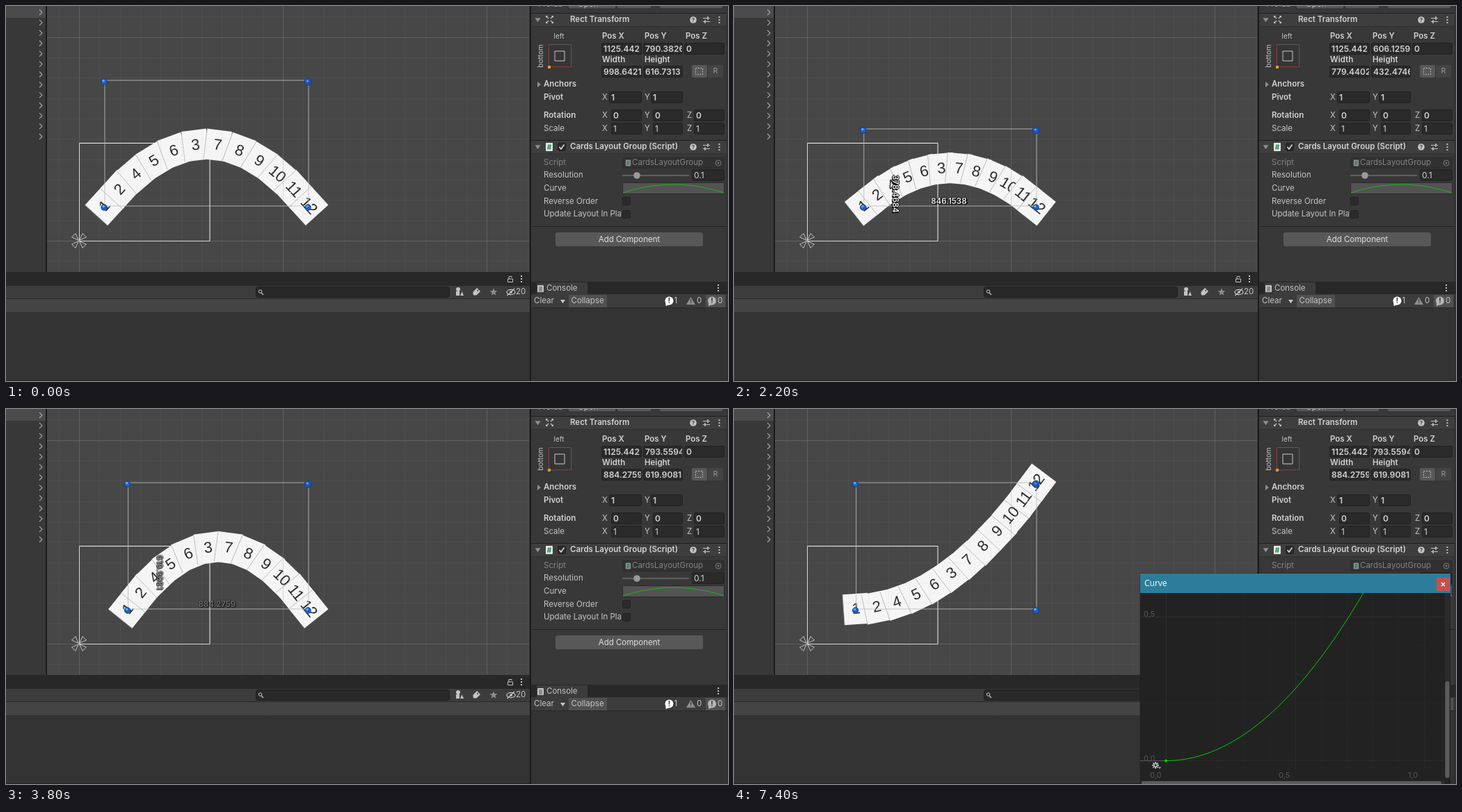
Animation, 1038 px wide and 540 px high, one loop 8 s. Source, as an HTML page with a canvas:

```html
<!DOCTYPE html>
<html lang="en">
<head>
<meta charset="utf-8">
<title>Cards layout group</title>
<style>
  html, body { margin: 0; width: 100%; height: 100%; overflow: hidden; background: #383838; }
  canvas { display: block; }
</style>
</head>
<body>
<canvas id="stage" width="1038" height="540"></canvas>
<script>
const g = document.getElementById('stage').getContext('2d');
const LOOP = 8000, SCALE = 0.2934;
const RIGHT = 435, BOTTOM = 288;
const LABELS = [1, 2, 4, 5, 6, 3, 7, 8, 9, 10, 11, 12];
const UI = 'Inter, sans-serif', ARIAL = '"Liberation Sans", sans-serif';

// Time, width and height of the rectangle while its corner is dragged.
const DRAG = [
  [600, 998.6421, 616.7313], [800, 1024, 603], [1000, 947.8126, 661.207],
  [1100, 896.9832, 705.6827], [1300, 800, 735], [1500, 715, 700],
  [1700, 662, 610], [1900, 685, 510], [2100, 779.4402, 432.4746],
  [2200, 846.1538, 378.4684], [2400, 968, 350], [2600, 1075, 410],
  [2800, 1138, 520], [3000, 1100.301, 626.2618], [3100, 1084.417, 638.9691],
  [3300, 1026, 645], [3500, 884.2759, 619.9081]
];

function sizeAt(t) {
  const last = DRAG.length - 1;
  if (t <= DRAG[0][0]) return DRAG[0].slice(1);
  if (t >= DRAG[last][0]) return DRAG[last].slice(1);
  const i = DRAG.findIndex(k => k[0] > t) - 1;
  const a = DRAG[i], b = DRAG[i + 1], span = b[0] - a[0], s = (t - a[0]) / span;
  const tangent = (j, c) => {
    if (j === 0 || j === last) return 0;
    const p = DRAG[j - 1], n = DRAG[j + 1];
    return (n[c] - p[c]) / (n[0] - p[0]) * span;
  };
  return [1, 2].map(c =>
    (1 + 2 * s) * (1 - s) ** 2 * a[c] + s * (1 - s) ** 2 * tangent(i, c) +
    s * s * (3 - 2 * s) * b[c] + s * s * (s - 1) * tangent(i + 1, c));
}

const arch = u => 1.976 * u * (1 - u);
const ramp = u => u * u;
const number = v => String(Number(v.toPrecision(7)));

function box(x, y, w, h, fill, radius = 0, stroke) {
  g.beginPath();
  g.roundRect(x, y, w, h, radius);
  if (fill) { g.fillStyle = fill; g.fill(); }
  if (stroke) { g.strokeStyle = stroke; g.lineWidth = 1; g.stroke(); }
}
function poly(points, fill, stroke, width = 1, close = true) {
  g.beginPath();
  points.forEach(([x, y]) => g.lineTo(x, y));
  if (close) g.closePath();
  if (fill) { g.fillStyle = fill; g.fill(); }
  if (stroke) { g.strokeStyle = stroke; g.lineWidth = width; g.stroke(); }
}
const line = (x1, y1, x2, y2, color, width = 1) =>
  poly([[x1, y1], [x2, y2]], null, color, width, false);
function disc(x, y, r, fill, stroke, width = 1) {
  g.beginPath();
  g.arc(x, y, r, 0, 7);
  if (fill) { g.fillStyle = fill; g.fill(); }
  if (stroke) { g.strokeStyle = stroke; g.lineWidth = width; g.stroke(); }
}
function text(s, x, y, { color = '#c4c4c4', size = 11.5, weight = 400, family = UI, align = 'left' } = {}) {
  g.font = `${weight} ${size}px ${family}`;
  g.textAlign = align;
  g.textBaseline = 'middle';
  g.fillStyle = color;
  g.fillText(s, x, y);
}
const bold = (s, x, y) => text(s, x, y, { weight: 600, color: '#d2d2d2' });
function clipped(x, y, w, h, draw) {
  g.save();
  g.beginPath();
  g.rect(x, y, w, h);
  g.clip();
  draw();
  g.restore();
}
function turned(x, y, angle, draw) {
  g.save();
  g.translate(x, y);
  g.rotate(angle);
  draw();
  g.restore();
}
function field(x, y, w, value, weight = 400) {
  box(x + .5, y + .5, w - 1, 16, '#2a2a2a', 2, '#212121');
  clipped(x + 1, y, w - 2, 17, () => text(value, x + 3, y + 9, { weight, size: 12, color: '#d2d2d2' }));
}
const triangleDown = (x, y, r = 4, color = '#8f8f8f') =>
  poly([[x - r, y - r * .7], [x + r, y - r * .7], [x, y + r * .8]], color);
const dots = (x, y) => [-4, 0, 4].forEach(d => box(x - 1, y + d - 1, 2, 2, '#c4c4c4'));

function gear(x, y) {
  for (let i = 0; i < 4; i++) turned(x, y, i * Math.PI / 4, () => box(-1, -5, 2, 10, '#aaa'));
  disc(x, y, 3, '#aaa');
  disc(x, y, 1.3, '#222');
  triangleDown(x + 6, y + 4, 2, '#aaa');
}

/* ---------- scene view ---------- */

function drawGrid() {
  for (let i = -1; i < 23; i++) {
    const x = Math.round(105 + i * 29.3) + .5;
    line(x, 0, x, 383, `rgba(150,150,150,${i % 10 ? .07 : .3})`);
  }
  for (let i = -1; i < 12; i++) {
    const y = Math.round(338 - i * 29.35) + .5;
    line(58, y, 752, y, `rgba(150,150,150,${i % 10 ? .07 : .3})`);
  }
}

// Cards sit at equal distances along the curve, sampled in ten straight pieces.
function drawCards(left, width, height, curve) {
  const points = Array.from({ length: 11 }, (_, i) =>
    [left + i / 10 * width, BOTTOM - curve(i / 10) * height]);
  const lengths = [0];
  for (let i = 1; i < points.length; i++) {
    const [a, b] = [points[i - 1], points[i]];
    lengths.push(lengths[i - 1] + Math.hypot(b[0] - a[0], b[1] - a[1]));
  }
  LABELS.forEach((label, k) => {
    const goal = lengths[10] * k / (LABELS.length - 1);
    let i = 1;
    while (i < 10 && lengths[i] < goal) i++;
    const s = (goal - lengths[i - 1]) / (lengths[i] - lengths[i - 1]);
    const [x1, y1] = points[i - 1], [x2, y2] = points[i];
    turned(x1 + (x2 - x1) * s, y1 + (y2 - y1) * s, Math.atan2(y2 - y1, x2 - x1), () => {
      box(-18, -22, 36, 44, '#f5f5f5');
      line(-18, -22, -18, 22, '#b4b4b4', .8);
      text(label, 0, .5, { size: 22, family: ARIAL, color: '#2c2c2c', align: 'center' });
    });
  });
}

function drawHandle(x, y, pivot) {
  disc(x, y, pivot ? 5 : 4.2, '#1d62d0', '#123a78');
  disc(x - 1, y - 1.5, 1.8, '#63a8ff');
  if (pivot) disc(x, y, 3, null, '#1b4487');
}

function sizeLabel(value) {
  const style = { weight: 600, align: 'center' };
  for (const [dx, dy] of [[-1, 0], [1, 0], [0, -1], [0, 1], [1, 1], [2, 1]])
    text(value, dx, dy, { ...style, color: '#111' });
  text(value, 0, 0, { ...style, color: '#ececec' });
}

function drawScene(t, curve) {
  const [w, h] = sizeAt(t);
  const width = w * SCALE, height = h * SCALE;
  const left = RIGHT - width, top = BOTTOM - height;
  clipped(58, 0, 694, 383, () => {
    box(58, 0, 694, 383, '#474747');
    box(105.5, 197.5, 187.5, 141, null, 0, '#f2f2f2');
    drawCards(left, width, height, curve);
    drawGrid();
    box(left, top, width, height, null, 0, 'rgba(190,190,190,.85)');
    for (let i = 0; i < 4; i++) turned(105, 338, (i + .5) * Math.PI / 2, () =>
      poly([[1, 0], [11, -3.8], [11, 3.8]], null, '#dcdcdc', .8));
    for (const x of [left - 1, RIGHT - 1])
      for (const y of [top + 2, BOTTOM + 2])
        drawHandle(x, y, x > left && y < BOTTOM);

    const alpha = t < 700 ? 0 : Math.min(1, Math.max(0, (4000 - t) / 500));
    if (alpha) {
      g.globalAlpha = alpha;
      turned((left + RIGHT) / 2 - 2, 282, 0, () => sizeLabel(number(w)));
      turned(left + 44.5, (top + BOTTOM) / 2 + 38, Math.PI / 2, () => sizeLabel(number(h)));
      g.globalAlpha = 1;
    }
  });
}

/* ---------- panels ---------- */

function drawHierarchy() {
  box(0, 0, 57, 383, '#383838');
  box(0, 0, 57, 17, '#4b4b4b');
  for (let i = 0; i < 13; i++) {
    const y = 9 + i * 14.92;
    poly([[48, y - 4], [52, y], [48, y + 4]], null, '#a4a4a4', 1.2, false);
  }
  box(57, 0, 2, 384, '#1b1b1b');
}

function drawProject() {
  box(0, 383, 753, 157, '#333');
  box(0, 383, 753, 20, '#282828');
  box(0, 403, 753, 19, '#3c3c3c');
  box(0, 422, 753, 19, '#444');
  line(0, 421.5, 753, 421.5, '#2a2a2a');
  line(0, 441.5, 753, 441.5, '#303030');
  box(0, 539, 753, 1, '#222');
  box(721.5, 393, 7, 4.5, null, 0, '#c4c4c4');
  poly([[723, 393], [723, 389.5], [727, 389.5], [727, 391]], null, '#c4c4c4', 1, false);
  dots(741, 393);
  box(359.5, 404.5, 278, 15, '#282828', 3, '#1f1f1f');
  disc(365.5, 411, 2.3, null, '#c4c4c4');
  line(367, 413, 370, 416, '#c4c4c4', 1.3);
  disc(650, 408, 3, '#c4c4c4');
  box(647, 411, 5, 6, '#c4c4c4');
  poly([[653, 417], [655.5, 411], [658, 417]], '#c4c4c4');
  turned(676, 412, -Math.PI / 4, () => {
    poly([[-6, 0], [-3, -3.5], [5, -3.5], [5, 3.5], [-3, 3.5]], '#c4c4c4');
    disc(3, 0, 1, '#3c3c3c');
  });
  poly(Array.from({ length: 10 }, (_, i) => {
    const r = i % 2 ? 2.4 : 5.8, a = i * Math.PI / 5 - Math.PI / 2;
    return [701 + r * Math.cos(a), 412 + r * Math.sin(a)];
  }), '#8d8d8d');
  g.beginPath();
  g.ellipse(726, 412, 6, 3.6, 0, 0, 7);
  g.strokeStyle = '#c4c4c4';
  g.lineWidth = 1.3;
  g.stroke();
  disc(726, 412, 1.8, '#c4c4c4');
  line(720.5, 417, 731, 407, '#c4c4c4', 1.3);
  text('20', 733, 412);
}

function componentHeader(y, title) {
  box(755, y - 10, 281, 19, '#3e3e3e');
  line(755, y - 9.5, 1036, y - 9.5, '#1f1f1f');
  line(755, y + 9.5, 1036, y + 9.5, '#303030');
  triangleDown(764.5, y);
  bold(title, 811, y);
  disc(988, y, 4.8, '#c4c4c4');
  text('?', 988, y + .5, { size: 8, weight: 700, color: '#3e3e3e', align: 'center' });
  line(1002, y - 2.5, 1012, y - 2.5, '#c4c4c4');
  line(1002, y + 2.5, 1012, y + 2.5, '#c4c4c4');
  line(1009, y - 5, 1009, y, '#c4c4c4', 1.5);
  line(1005, y, 1005, y + 5, '#c4c4c4', 1.5);
  dots(1025.5, y);
}

function scriptIcon(x, y, scale, color) {
  box(x - 5 * scale, y - 6 * scale, 10 * scale, 12 * scale, color, 1);
  text('#', x, y + .5, { size: 10 * scale, weight: 700, color: '#16884a', align: 'center' });
}

function axes(y, labels, value, weight, fieldX) {
  labels.forEach((name, i) => {
    const x = [857, 918, 979][i];
    text(name, x, y);
    field(fieldX[i], y - 9, [914, 973, 1033][i] - fieldX[i], value, weight);
  });
}

function drawTransform([w, h]) {
  componentHeader(20, 'Rect Transform');
  for (const a of [0, 1, 2, 3]) turned(781.5, 19.5, a * Math.PI / 2, () => {
    line(1.5, 1.5, 5, 5, '#c4c4c4', 1.3);
    poly([[5.5, 2.5], [5.5, 5.5], [2.5, 5.5]], '#c4c4c4');
  });
  text('left', 795, 43.5, { size: 10, align: 'center' });
  turned(768.5, 72, -Math.PI / 2, () => text('bottom', 0, 0, { size: 10, align: 'center' }));
  box(780.5, 55.5, 32, 32, '#353535', 0, '#5c5c5c');
  line(780.5, 55, 780.5, 88, '#8f3c38');
  line(780, 87.5, 813, 87.5, '#8f3c38');
  box(779, 86, 4, 4, '#e09a2c');
  box(789, 65, 14, 14, null, 0, '#c8c8c8');

  bold('Pos X', 857, 44);
  bold('Pos Y', 918, 44);
  bold('Pos Z', 977, 44);
  field(856, 53, 58, '1125.442', 600);
  field(916, 53, 57, number(h + 173.6513), 600);
  field(975, 53, 58, '0', 600);
  bold('Width', 857, 78);
  bold('Height', 918, 78);
  field(856, 86, 58, number(w), 600);
  field(916, 86, 57, number(h), 600);
  box(986, 85, 22, 18, '#585858', 2);
  g.setLineDash([2, 1.5]);
  g.strokeStyle = '#bbb';
  g.strokeRect(991.5, 89.5, 10, 9);
  g.setLineDash([]);
  box(1009, 85, 22, 18, '#444', 2);
  text('R', 1020, 94, { color: '#999', size: 10.5, align: 'center' });

  poly([[764, 109], [769, 113], [764, 117]], '#8f8f8f');
  bold('Anchors', 773, 113);
  bold('Pivot', 773, 132);
  axes(132, ['X', 'Y'], '1', 600, [867, 927]);
  bold('Rotation', 773, 158);
  axes(158, ['X', 'Y', 'Z'], '0', 600, [870, 930, 989]);
  text('Scale', 773, 177);
  axes(177, ['X', 'Y', 'Z'], '1', 400, [870, 930, 989]);
}

function drawScript() {
  componentHeader(203, 'Cards Layout Group (Script)');
  scriptIcon(781, 203, 1, '#e6e6e6');
  box(793.5, 197.5, 11, 11, '#2a2a2a', 2, '#212121');
  poly([[795.5, 203], [798, 206], [802.5, 199.5]], null, '#e0e0e0', 1.5, false);
  text('Script', 773, 226, { color: '#828282' });
  box(886.5, 218.5, 146, 15, '#313131', 2, '#2b2b2b');
  scriptIcon(894.5, 226, .75, '#8d8d8d');
  text('CardsLayoutGroup', 900, 226, { color: '#828282' });
  disc(1024, 226, 4, null, '#777');
  disc(1024, 226, 1.5, '#777');
  text('Resolution', 773, 244);
  box(886, 243, 96, 2, '#5e5e5e');
  disc(907, 244, 4.8, '#999');
  field(986, 235, 47, '0.1');
  text('Curve', 773, 263);
  box(886.5, 254.5, 146, 16, '#545454', 1, '#2a2a2a');
  poly(Array.from({ length: 41 }, (_, i) => [887 + i * 3.63, 269 - arch(i / 40) * 24]), null, '#18b818', 1, false);
  text('Reverse Order', 773, 281.5);
  clipped(773, 290, 111, 20, () => text('Update Layout In Play Mode', 773, 300));
  for (const y of [275.5, 294.5]) box(886.5, y, 11, 11, '#2a2a2a', 2, '#212121');
  box(755, 317, 281, 1, '#222');
  box(790, 326, 212, 20, '#585858', 3);
  text('Add Component', 896, 336.5, { color: '#e0e0e0', align: 'center' });
}

function drawConsole() {
  box(755, 397, 283, 143, '#333');
  box(755, 397, 283, 18, '#282828');
  box(763, 398, 73, 17, '#3c3c3c');
  box(764, 402, 9, 10, '#c4c4c4', 1);
  [405, 407.5, 410].forEach(y => line(766, y, 771, y, '#3c3c3c'));
  text('Console', 777, 407);
  dots(1024, 406);
  box(755, 415, 283, 19, '#3c3c3c');
  text('Clear', 759, 425);
  triangleDown(800.5, 425.5, 3.5, '#c4c4c4');
  box(809, 416, 55, 18, '#505050');
  text('Collapse', 812.5, 425);
  box(1006, 416, 28, 18, '#505050');
  for (const [x, color] of [[953.5, '#fff'], [1015, '#b5b5b5']]) {
    disc(x, 424.5, 6, color);
    poly([[x - 5, 426], [x - 5, 432], [x, 430]], color);
    text('!', x, 425, { color: '#333', weight: 700, size: 10, align: 'center' });
  }
  poly([[978, 430], [984.5, 419], [991, 430]], '#8d8d8d');
  text('!', 984.5, 426, { color: '#333', weight: 700, size: 8, align: 'center' });
  text('1', 960.5, 425);
  text('0', 993, 425);
  text('0', 1023, 425);
  line(755, 434.5, 1038, 434.5, '#282828');
}

function drawInspector(size) {
  box(753, 0, 285, 540, '#383838');
  text('Prefab', 765, -2, { color: '#aaa' });
  for (const [x, w] of [[808, 69], [878, 50], [939, 92]]) box(x, -8, w, 12, '#555', 3, '#2c2c2c');
  text('Open', 822, -2);
  drawTransform(size);
  drawScript();
  drawConsole();
  box(753, 0, 2, 540, '#1b1b1b');
  box(1036, 0, 1, 540, '#2a2a2a');
}

/* ---------- curve window ---------- */

function drawCurveWindow(curve) {
  const X = u => 621 + u * 371.5, Y = v => 506.5 - v * 414;
  const isArch = curve === arch;
  box(583, 236, 447, 304, 'rgba(0,0,0,.2)');
  box(584, 265, 446, 275, '#222');
  box(584, 237, 446, 28, '#2d7d9a');
  text('Curve', 590, 252, { size: 12, family: '"Open Sans", sans-serif', color: '#fff' });
  box(1010, 243, 19, 19, '#c75050');
  for (const s of [-1, 1]) line(1017, 252.5 - 2.5 * s, 1022, 252.5 + 2.5 * s, '#fff', 1.2);

  clipped(584, 265, 446, 275, () => {
    for (let i = 0; i <= 10; i++) {
      const x = Math.round(X(i / 10)) + .5;
      line(x, 265, x, 518, i % 5 ? '#252525' : '#2d2d2d');
    }
    for (let i = 0; i <= 5; i++) {
      const y = Math.round(Y(i / 10)) - .5;
      line(584, y, 1022, y, i % 5 ? '#252525' : '#2d2d2d');
    }
    const dim = { color: '#585858', size: 11 };
    text('0,5', 589, 296, dim);
    text('0,0', 589, 503.5, dim);
    ['0,0', '0,5', '1,0'].forEach((s, i) => text(s, [598, 783, 969][i], 528, dim));

    line(584, 506.5, 621, 506.5, '#555');
    if (isArch) line(992, 506.5, 1022, 506.5, '#555');
    poly(Array.from({ length: 101 }, (_, i) => [X(i / 100), Y(curve(i / 100))]), null, '#00d200', 1, false);
    for (const u of [0, 1]) {
      const x = X(u), y = Y(curve(u));
      poly([[x - 2.5, y], [x, y - 2.5], [x + 2.5, y], [x, y + 2.5]], '#00dc00');
    }
    gear(606, 513);
    if (isArch) gear(1005, 513);
    box(1022, 265, 7, 267, '#2b2b2b');
    const barTop = isArch ? 266 : 392;
    box(1022.5, barTop, 6, 531 - barTop, '#5c5c5c', 3);
    box(584, 535, 438, 5, '#2b2b2b');
    box(586, 536, 431, 5, '#5c5c5c', 3);
  });
}

function render(now) {
  const t = Math.floor(now % LOOP / 100) * 100;
  const curve = t < 7400 ? arch : ramp;
  drawScene(t, curve);
  drawHierarchy();
  drawProject();
  drawInspector(sizeAt(t - 100));
  if (t >= 5600) {
    g.globalAlpha = t < 5700 ? .5 : 1;
    drawCurveWindow(curve);
    g.globalAlpha = 1;
  }
}

const start = performance.now();
function tick() {
  render(performance.now() - start);
  requestAnimationFrame(tick);
}
tick();
</script>
</body>
</html>
```
